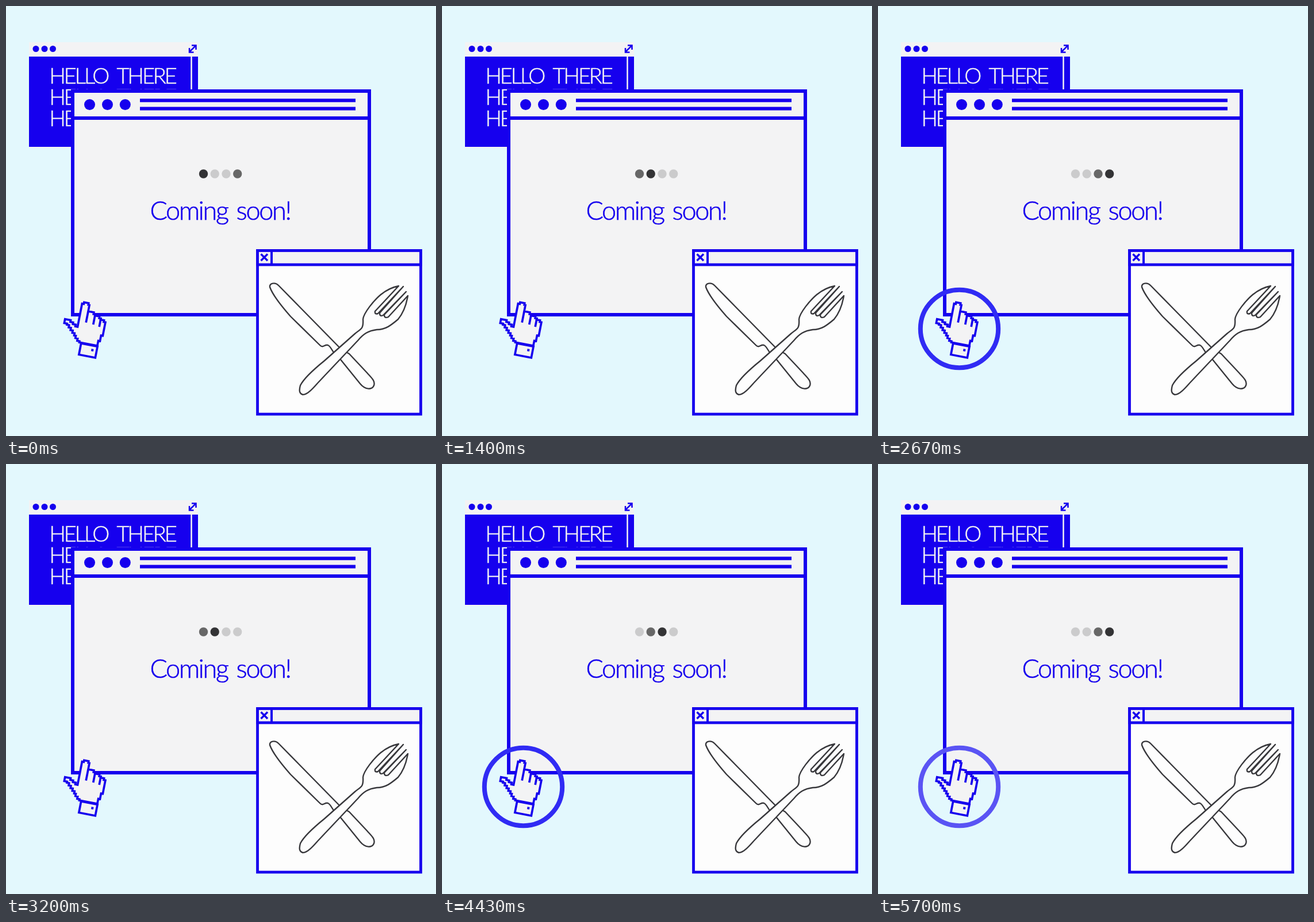
Animation, 748 px wide and 748 px high, one loop 5730 ms. Source, as an HTML page:

```html
<!DOCTYPE html>
<html lang="en">
<head>
<meta charset="utf-8">
<title>Coming soon</title>
<style>
  html, body { margin: 0; width: 100%; height: 100%; overflow: hidden; background: #e3f8fd; }
  svg { display: block; width: 100vw; height: 100vh; }
  .ink { fill: #1600ee; }
  .paper { fill: #f3f3f4; }
  .line { stroke: #1600ee; fill: none; }
  .sketch { stroke: #38383c; stroke-width: 2.4; fill: #fdfdfd; stroke-linejoin: round; stroke-linecap: round; }
  text { font-family: Lato, "Open Sans", Roboto, sans-serif; font-weight: 300; text-anchor: middle; stroke-width: .6; }
  .hello { font-size: 38px; letter-spacing: -3.1px; word-spacing: 9px; fill: #f3f3f4; stroke: #f3f3f4; }
  .soon { font-size: 45px; letter-spacing: -2.3px; word-spacing: 5px; fill: #1600ee; stroke: #1600ee; }
</style>
</head>
<body>
<svg viewBox="0 0 748 748">
  <!-- greeting window -->
  <rect class="paper" x="40" y="63" width="294" height="184"/>
  <rect class="ink" x="40" y="88" width="294" height="157"/>
  <g class="ink">
    <circle cx="52" cy="74.5" r="5.5"/>
    <circle cx="67" cy="74.5" r="5.5"/>
    <circle cx="81.5" cy="74.5" r="5.5"/>
  </g>
  <path class="line" stroke-width="2.5" d="M319.5 79.5L330 69M323 68.5H330.5V76M319 73V80.5H326.5"/>
  <path d="M322.5 88V146" stroke="#f3f3f4" stroke-width="2.5"/>
  <g class="hello">
    <text x="185" y="135">HELLO THERE</text>
    <text x="185" y="172">HELLO THERE</text>
    <text x="185" y="209">HELLO THERE</text>
  </g>

  <!-- main window -->
  <g class="line" stroke-width="6">
    <rect x="116" y="148" width="516" height="389" style="fill:#f3f3f4"/>
    <path d="M116 195H632M233 164.3H608M233 178.4H608"/>
  </g>
  <g class="ink">
    <circle cx="145.5" cy="171.5" r="9.5"/>
    <circle cx="176.5" cy="171.5" r="9.5"/>
    <circle cx="207.3" cy="171.5" r="9.5"/>
  </g>
  <g id="loader">
    <circle cx="343.5" cy="292" r="7.7"/>
    <circle cx="363.2" cy="292" r="7.7"/>
    <circle cx="383" cy="292" r="7.7"/>
    <circle cx="402.7" cy="292" r="7.7"/>
  </g>
  <text class="soon" x="372.5" y="372">Coming soon!</text>

  <!-- cutlery window -->
  <g class="line" stroke-width="4.8">
    <rect x="437.5" y="425.5" width="284" height="284.5" style="fill:#fdfdfd"/>
    <rect x="437.5" y="425.5" width="284" height="24.5" style="fill:#f3f3f4"/>
    <path d="M462 425V450" stroke-width="4"/>
    <path d="M443.5 431.5L455 443M455 431.5L443.5 443" stroke-width="3.4"/>
  </g>
  <g class="sketch">
    <path d="M459 489C458 482 468 480 474 486L583 597L597 605L628 638C634 645 643 652 640 660C637 668 625 668 616 657L582 615L572 605C567 600 565 592 560 590C554 588 552 596 546 590L495 540C480 523 464 503 459 489Z"/>
    <path d="M512 660C517 650 533 634 554 617L607 570C618 561 622 562 621 545C622 534 640 512 652 502Q667 490 683 487L642 531Q641 537 647 535L691 488L650 534Q650 541 656 538L696 497L658 537Q658 544 665 541L699 504C697 516 692 533 682 545C669 556 660 563 645 563C630 565 622 570 612 582L543 655C535 664 524 677 516 676Q508 674 512 660Z"/>
  </g>

  <!-- pointer -->
  <g transform="translate(139 515) rotate(11)">
    <g class="line" stroke-width="3.7">
      <path style="fill:#f3f3f4" d="M-6 43V4H-3V1H5V4H7V15H17V18H20V20H28V23H31V25H37V28H40V52H37V62H34V71H2V69H-2V65H-6V61H-9V57H-13V53H-17V49H-21V45H-25V43H-30V36H-20V39H-15V42H-10V45H-6Z"/>
      <path d="M7 15V35M20 19V36M31 24V38"/>
      <rect x="5.5" y="72" width="29" height="20" style="fill:#f3f3f4"/>
    </g>
    <rect class="ink" x="25" y="78" width="4" height="4"/>
  </g>
  <circle id="ring" cx="141.5" cy="561.5" r="67.7" fill="none" stroke="none" stroke-width="8"/>
</svg>
<script>
  const LOOP = 5730, LOADER = 955, BLINK = 455;
  const shades = ['#333335', '#cbcbcc', '#cbcbcc', '#676767'];
  const glow = ['none', '#5a54f4', '#302bf4'];
  const dots = document.querySelectorAll('#loader circle');
  const ring = document.getElementById('ring');
  const step = (t, period, count) => Math.floor((t % period) / period * count);

  function draw(now) {
    const t = now % LOOP;
    const head = step(t, LOADER, 4);
    dots.forEach((dot, i) => dot.setAttribute('fill', shades[(i - head + 4) % 4]));
    ring.setAttribute('stroke', glow[step(t, BLINK, 3)]);
  }

  const start = performance.now();
  function tick() {
    draw(performance.now() - start);
    requestAnimationFrame(tick);
  }
  tick();
</script>
</body>
</html>
```
